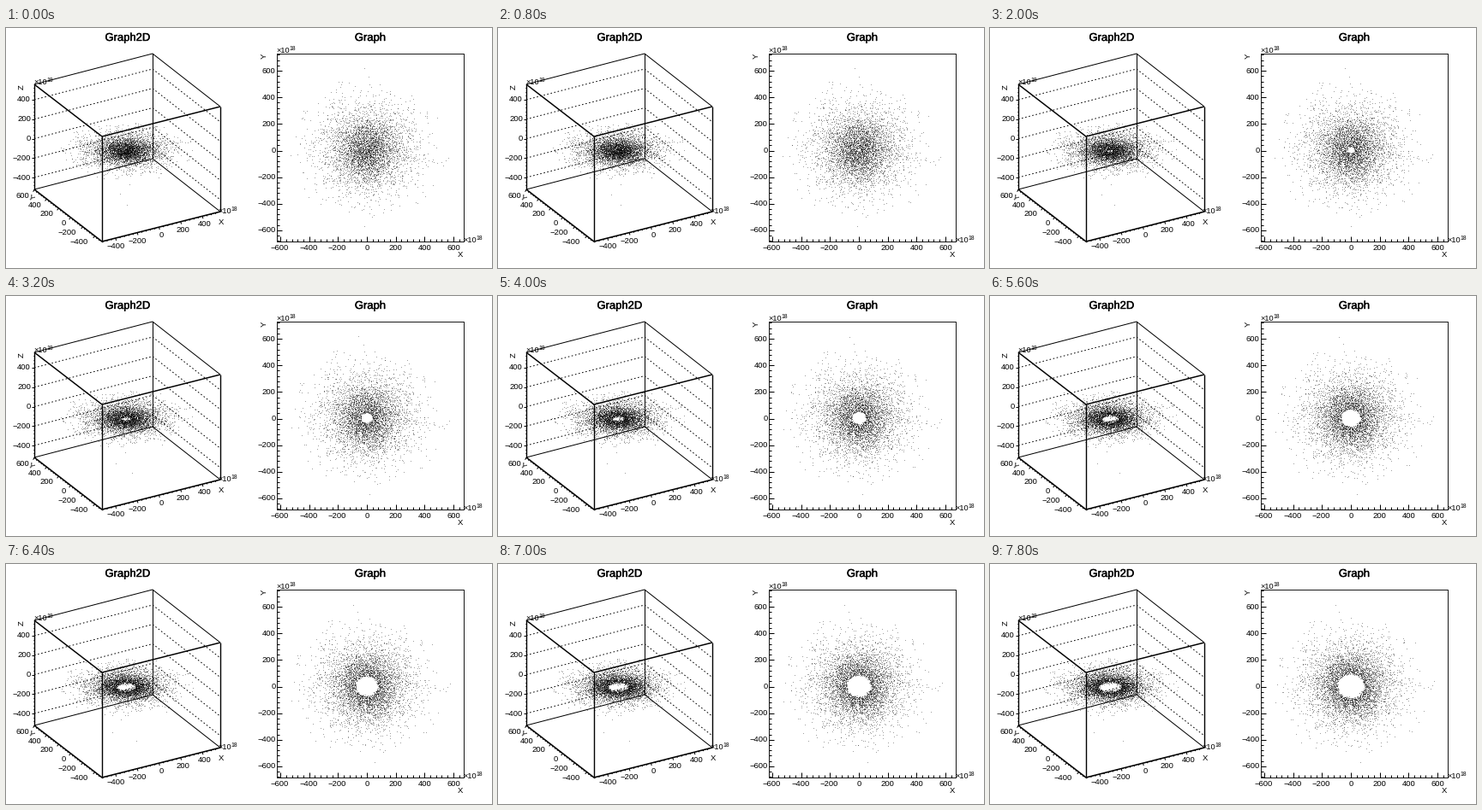
A matplotlib script that plays this animation: 567x281 px, repeating every 8000 ms.

```python
import numpy as np
import matplotlib.pyplot as plt
from matplotlib import patheffects
from matplotlib.animation import FuncAnimation

W, H, DPI = 567, 281, 100
PX = 72 / DPI
FRAMES, STEP = 40, 200
CORE, HALO, SPEED, DOT = 1600, 3000, 11.8, 0.37

plt.rcParams["font.family"] = "Liberation Sans"
fig = plt.figure(figsize=(W / DPI, H / DPI), dpi=DPI, facecolor="white")
ax = fig.add_axes([0, 0, 1, 1])
ax.set_xlim(0, W)
ax.set_ylim(H, 0)
ax.axis("off")


def line(*pts, width=1.0, **kw):
    x, y = zip(*pts)
    ax.plot(x, y, color="black", lw=width * PX, solid_capstyle="butt", **kw)


def text(x, y, s, size=9.5, ha="center", va="center", **kw):
    return ax.text(x, y, s, fontsize=size * PX, ha=ha, va=va,
                   color="black", **kw)


def title(x, s):
    label = text(x, 12, s, 13)
    label.set_path_effects([patheffects.withStroke(linewidth=0.3,
                                                   foreground="black")])


def exponent(x, y):
    text(x, y, "×10", 9.2, ha="left", va="baseline")
    text(x + 15, y - 3, "18", 6.8, ha="left", va="baseline")


def number(v):
    return str(v).replace("-", "−")


def ticks(place, lo, hi, direction, major, minor):
    """Minor ticks every 40 units, longer ones every 200."""
    for v in range(-680, 721, 40):
        if lo <= v <= hi:
            p = np.array(place(v))
            size = minor if v % 200 else major
            line(p, p + size * np.array(direction))


# Three-dimensional view: pixel vectors per unit of each axis
EX = np.array([138, -35]) / 1090
EY = np.array([-79, -61]) / 1125
EZ = np.array([0, -123]) / 1081
CENTRE = np.array([140, 144.5])

LEFT, BACK, RIGHT, FRONT = (33, 66), (171, 30), (250, 92), (112, 127)
DEPTH = 123


def low(p):
    return p[0], p[1] + DEPTH


def draw_box():
    line(LEFT, BACK, RIGHT)
    line(BACK, low(BACK))
    line(low(LEFT), low(BACK), low(RIGHT))
    line(LEFT, FRONT, RIGHT, width=1.5, zorder=4)
    line(low(LEFT), low(FRONT), low(RIGHT), width=1.6, zorder=4)
    for corner in (LEFT, FRONT, RIGHT):
        line(corner, low(corner), width=1.4, zorder=4)

    def on_z(v):
        return 33, 129.5 - v * 0.1138

    def on_x(v):
        return np.array([178.5, 233.1]) + v * EX

    def on_y(v):
        return np.array([75.5, 221.8]) + v * EY

    ticks(on_z, -520, 555, (-1, 0), 3, 1.5)
    ticks(on_x, -520, 555, (0.25, 0.97), 3, 1.5)
    ticks(on_y, -500, 600, (-0.61, 0.79), 3, 1.5)

    for v in range(-400, 401, 200):
        y = on_z(v)[1]
        line((33, y), (171, y - 36), (250, y + 26), ls=(0, (1.6, 2.6)))
        text(29, y, number(v), ha="right")
        x, y = on_x(v)
        text(x + (0.5 if v < 0 else 2.5), y + 9.5, number(v))
    for v in range(-400, 601, 200):
        x, y = on_y(v)
        text(x - (8 if v < 0 else 6), y + 7, number(v), ha="right")

    title(142, "Graph2D")
    text(18, 69, "Z", rotation=90)
    text(251, 228, "X")
    text(29, 199, "Y", rotation=-38)
    exponent(32, 66)
    exponent(247, 217)


# Flat view
ORIGIN = np.array([421, 143.5])
SCALE = np.array([0.1682, -0.1556])


def draw_frame():
    line((316, 30), (534, 30), (534, 250), (316, 250), (316, 30), (317, 30),
         width=0.9)

    def on_x(v):
        return ORIGIN[0] + v * SCALE[0], 250

    def on_y(v):
        return 316, ORIGIN[1] + v * SCALE[1]

    ticks(on_x, -620, 672, (0, -1), 6, 3)
    ticks(on_y, -684, 730, (1, 0), 6, 3)
    for v in range(-600, 601, 200):
        text(on_x(v)[0] - (1 if v < 0 else 0), 258, number(v))
        text(314.5, on_y(v)[1], number(v), ha="right")

    title(425, "Graph")
    text(301, 33, "Y", rotation=90)
    text(530, 266, "X")
    exponent(315, 29)
    exponent(533, 251)


# A thin spinning disc whose particles drift along their tangents
rng = np.random.default_rng(12)
pos = np.vstack([rng.normal(0, 95, (CORE, 2)), rng.normal(0, 170, (HALO, 2))])
pos = pos[np.hypot(*pos.T) < 560]
strays = [(-20, 612), (565, -62), (-20, -572), (-440, 290)]
pos = np.vstack([pos, strays])
radius = np.hypot(*pos.T)
tangent = np.column_stack([-pos[:, 1], pos[:, 0]]) / radius[:, None]
speed = SPEED * rng.normal(1, 0.05, len(pos))
height = rng.normal(0, 11, len(pos))
height[:4] = rng.uniform(-500, -200, 4)

draw_box()
draw_frame()
cloud, = ax.plot([], [], ",", color="black", alpha=DOT, zorder=3)
disc, = ax.plot([], [], ",", color="black", alpha=DOT, zorder=3)


def update(i):
    t = i * STEP / 1000
    p = pos + tangent * (speed * t)[:, None]
    view = CENTRE + p[:, :1] * EX + p[:, 1:] * EY + height[:, None] * EZ
    cloud.set_data(*view.T)
    disc.set_data(*(ORIGIN + p * SCALE).T)
    return cloud, disc


anim = FuncAnimation(fig, update, frames=FRAMES, interval=STEP,
                     repeat=True, repeat_delay=0, blit=False)
plt.show()
```
